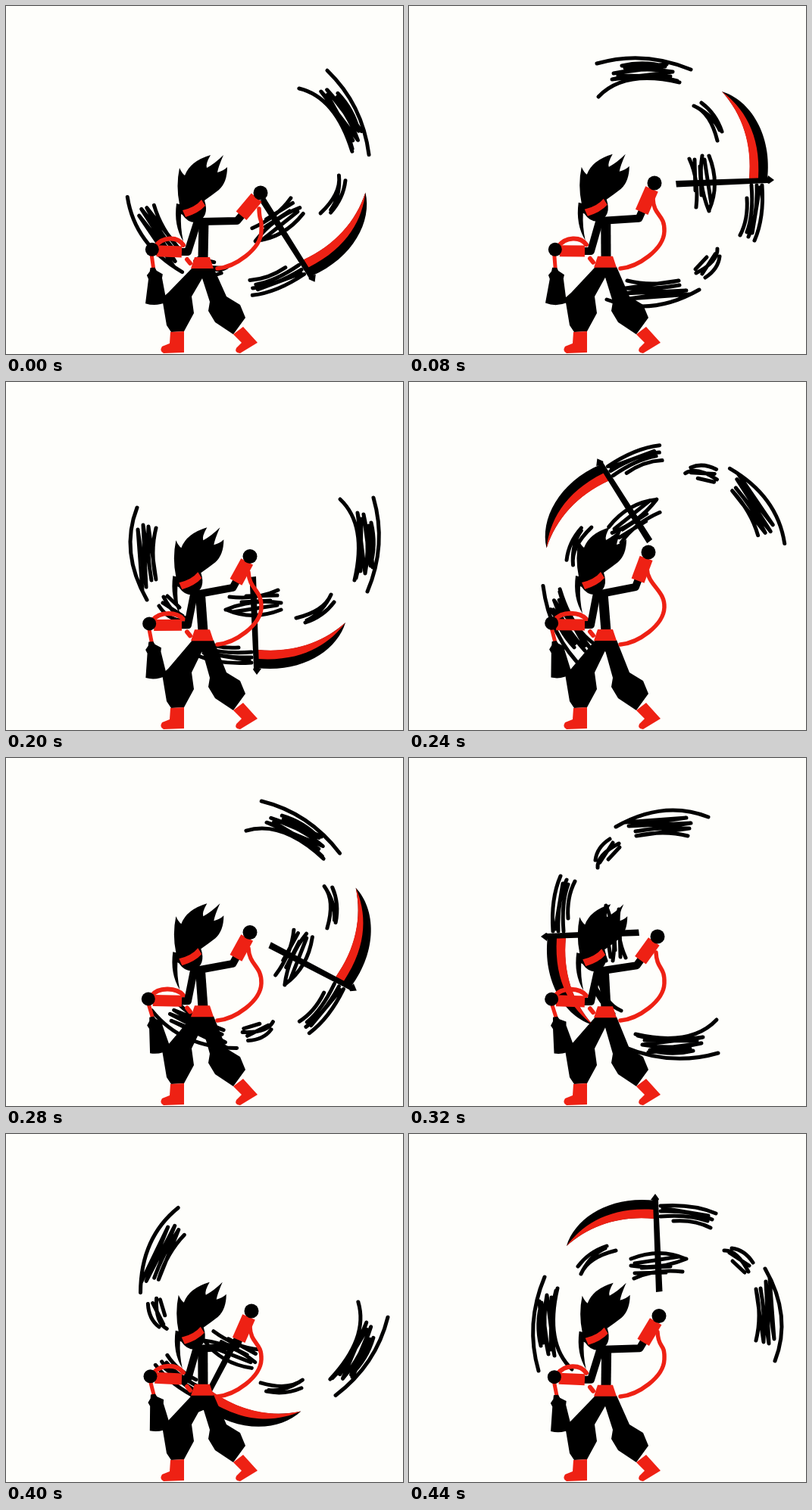
An HTML page with a canvas that plays this animation: 524x460 px, repeating every 480 ms.

```html
<!DOCTYPE html>
<html lang="en">
<head>
<meta charset="utf-8">
<title>Spinning sickle</title>
<style>
  html, body { margin: 0; width: 100%; height: 100%; overflow: hidden; background: #fefefb; }
  canvas { display: block; }
</style>
</head>
<body>
<canvas id="stage" width="524" height="460"></canvas>
<script>
const ctx = document.getElementById('stage').getContext('2d');
const RED = '#ee2114', BLACK = '#000', PAPER = '#fefefb';
const STEP = 40, STEPS = 12;
const PIVOT = [328, 233];

// Throwing hand at every second step of the first half; the second half mirrors it.
const HAND = [[336, 247], [324, 234], [328, 236], [316, 225]];

const SICKLE = {
  handle: new Path2D('M352 231L473 227L474 224L482 230L475 235L473 234L353 239.5Z'),
  blade: new Path2D('M413 113C450 124 480 170 473 230L449 230C454 183 440 143 413 113Z'),
  edge: new Path2D('M413 113C440 133 465 168 461 228L449 228C453 183 440 143 413 113Z')
};
const SMEARS = new Path2D([
  'M248 76Q310 58 372 84M250 120Q284 84 357 101',
  'M281 79Q310 72 338 80L270 89Q310 80 348 87L268 97Q310 87 354 99M285 82L340 77M276 92L345 93',
  'M261 388Q320 411 383 375',
  'M288 363Q320 371 356 363L286 373Q325 375 357 369L284 380L366 376L290 387L371 381',
  'M376 132Q398 141 407 178M386 128Q405 142 413 166M380 134Q402 146 410 164',
  'M407 321Q408 338 379 353M410 331Q408 348 391 359M393 332L378 348M404 328L387 354',
  'M370 202Q383 230 379 266M377 203L378 244M387 198Q381 235 396 271M396 198Q411 236 396 270M390 203L399 262M384 212L386 250',
  'M446 254Q448 282 437 303M452 237Q455 275 446 299M459 237Q460 280 448 305M466 237Q469 280 456 310M463 240L453 300'
].join(''));
const FEET = new Path2D('M217 431L235 430L235 458L208 459Q202 456 206 450L216 446ZM300 434L313 424L332 445L309 459Q301 458 304 452L311 445Z');
const BELT = new Path2D('M249 332L269 332L274 347L244 347Z');
const HEAD = new Path2D('M229 262Q224 238 229 214Q232 221 236 224Q243 205 270 197Q263 209 265 214Q276 208 287 197Q280 213 279 220Q287 218 292 213Q292 233 281 243Q272 250 262 257Q269 278 252 286Q240 287 233 276L231 275Q230 293 234 311Q221 290 225 261Z');
const BAND = new Path2D('M233 270Q250 266 258 256L263 264Q254 274 237 279Z');
const BAG = new Path2D('M-3 24L3 24L5 28L13 33L12 38L17 70Q3 76 -11 71L-6 39L-8 34L-4 29Z');

const mix = (a, b, u) => a.map((v, i) => v + (b[i] - v) * u);
const wave = (k, peak) => Math.cos((k - peak) * 2 * Math.PI / STEPS);

function fill(path, color = BLACK) {
  ctx.fillStyle = color;
  ctx.fill(path);
}

function stroke(path, width, color = BLACK, cap = 'round') {
  ctx.lineWidth = width;
  ctx.strokeStyle = color;
  ctx.lineCap = cap;
  ctx.stroke(path);
}

function line(points, width, color, cap) {
  stroke(new Path2D('M' + points.join('L')), width, color, cap);
}

function dot([x, y], radius) {
  const circle = new Path2D();
  circle.arc(x, y, radius, 0, 2 * Math.PI);
  fill(circle);
}

function at([x, y], degrees, draw) {
  ctx.save();
  ctx.translate(x, y);
  ctx.rotate(degrees * Math.PI / 180);
  draw();
  ctx.restore();
}

function throwingHand(k) {
  const p = Math.min(k, STEPS - k) / 2, i = Math.floor(p);
  return mix(HAND[i], HAND[Math.min(i + 1, 3)], p - i);
}

function drawSickle(k) {
  at(PIVOT, 150 * (k - 2), () => {
    ctx.translate(-PIVOT[0], -PIVOT[1]);
    stroke(SMEARS, 5);
    fill(SICKLE.blade);
    fill(SICKLE.edge, RED);
    fill(SICKLE.handle);
  });
}

function drawLegs(lift) {
  const waist = 346 + lift;
  fill(new Path2D(`M246 ${waist}L214 379L206 386L212 422L218 431L235 430L248 406L245 384L259 ${waist + 14}L269 391L267 403L276 418L300 434L316 412L309 395L291 384L274 ${waist}Z`));
  fill(FEET, RED);
}

function drawFighter(k) {
  const sway = (1 - wave(k, 0)) / 2;
  const lean = [-5 * sway, -5 * sway], lift = lean[1];
  const move = ([x, y]) => [x + lean[0], y + lift];
  const hand = throwingHand(k);
  const elbow = mix([305, 284], [299, 271], sway);
  const swing = wave(k, 1);
  const grip = [190.5 + 2.7 * swing, 320.3 + 1.8 * swing];
  const frontElbow = [240, 325 + lift * 0.8];

  drawLegs(lift);

  // Cord through both hands, and the weight hanging from it
  const [hx, hy] = hand, [gx, gy] = grip;
  stroke(new Path2D(`M${hx - 2} ${hy + 21}C${hx - 1} ${hy + 44} 338 275 337 298C336 322 302 345 279 347`), 5.5, RED);
  stroke(new Path2D(`M${gx + 4} ${gy - 4}C${gx + 14} ${gy - 17} 226 304 234 ${316 + lift / 2}`), 6, RED);
  line([[239, 335 + lift], [243, 340 + lift]], 6, RED);
  at(grip, -5 + 6.5 * wave(k, 2), () => {
    line([[-1, 6], [1, 25]], 5, RED);
    fill(BAG);
  });

  // Torso and arms
  line([move([261, 284]), [260, 334 + lift]], 13, BLACK, 'butt');
  line([move([253, 284]), frontElbow, [228, frontElbow[1]]], 10);
  line([move([258, 285]), elbow, mix(elbow, hand, 0.3)], 10);
  line([mix(elbow, hand, 0.18), mix(elbow, hand, 0.83)], 18, RED, 'butt');
  line([[232, frontElbow[1]], [gx + 6, gy + 2]], 15, RED, 'butt');
  dot(hand, 9.5);
  dot(grip, 9);

  at([0, lift], 0, () => fill(BELT, RED));
  at(lean, 0, () => {
    fill(HEAD);
    fill(BAND, RED);
  });
}

function frame(now) {
  const k = Math.floor(now / STEP) % STEPS;
  ctx.fillStyle = PAPER;
  ctx.fillRect(0, 0, 524, 460);
  ctx.lineJoin = 'round';
  drawSickle(k);
  drawFighter(k);
  requestAnimationFrame(() => frame(performance.now()));
}
frame(0);
</script>
</body>
</html>
```
